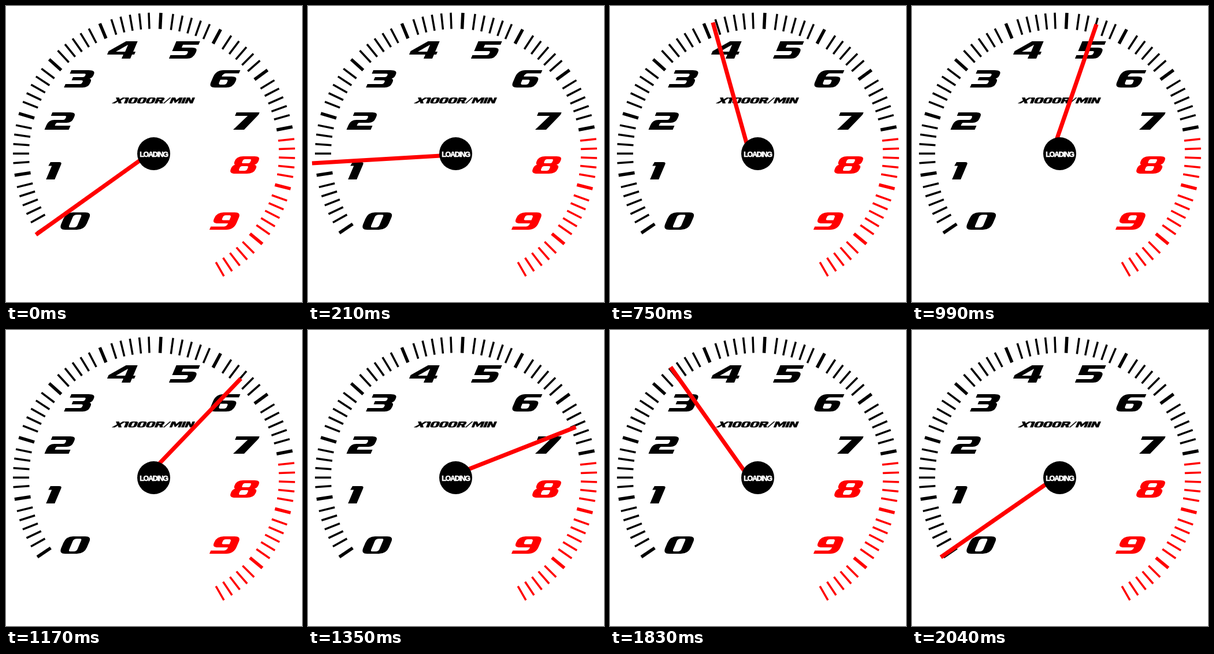
Recreate the animation shown at these times as an HTML page. Size 512 by 512 pixels, loop 2170 ms.

```html
<!DOCTYPE html>
<html lang="en">
<head>
<meta charset="utf-8">
<title>Loading gauge</title>
<style>
  html, body { margin: 0; width: 100%; height: 100%; overflow: hidden; background: #fff; }
  svg { display: block; width: 100vw; height: 100vh; }
  path { fill-rule: evenodd; }
  #unit { stroke: #000; stroke-width: 1.2px; }
  text { font: bold 12.5px "Liberation Sans", Arial, sans-serif; letter-spacing: -1.3px; fill: #fff; stroke: #fff; stroke-width: .7px; }
</style>
</head>
<body>
<svg viewBox="0 0 512 512">
  <g id="ticks"></g>
  <g id="digits"></g>
  <g id="unit" role="img" aria-label="X1000R/MIN"></g>
  <g id="needle"><path fill="#f00" d="M-5.4 -10L-3.6 -237H3.6L1.8 -10Z"/></g>
  <circle cx="255.5" cy="255.5" r="28.5"/>
  <text x="255.5" y="261" text-anchor="middle">LOADING</text>
</svg>
<script>
const RED = '#f00', BLACK = '#000';
const $ = id => document.getElementById(id);

function add(parent, tag, attrs) {
  const el = document.createElementNS('http://www.w3.org/2000/svg', tag);
  for (const k in attrs) el.setAttribute(k, attrs[k]);
  parent.append(el);
}

// Upright glyphs, 30 units tall; the slant is added when they are placed.
const six = 'M13 0H42V5.5H19Q14.5 6 14.5 11H32Q42 11 42 18V20Q42 30 30 30H11Q0 30 0 21V12Q0 0 13 0Z' +
  'M14.5 16.5V22Q15 25 18 25H24Q28 25 28 22V19Q28 16.5 25 16.5Z';
const glyphs = {
  0: 'M12 0H33Q44 0 44 9V19Q44 30 31 30H11Q0 30 0 20V11Q0 0 12 0ZM21 4H26Q29 4 29 7V22Q29 26 24 26H18Q15 26 15 23V8Q15 4 21 4Z',
  1: 'M-5 0H10Q15 0 15 4V30H0V6.5H-6Z',
  2: 'M1 0H32Q42 0 42 7V10Q42 18 33 18H17Q15 18 15 20V23H42V30H0V22Q0 13 10 13H25Q28 13 28 10V8Q28 6 25 6H1Z',
  3: 'M0 0H30Q42 0 42 7V9Q42 13 38 14.5Q42 16 42 20V22Q42 30 32 30H0V24H25Q28 24 28 21V20Q28 17.5 25 17.5H8V12H25Q28 12 28 9V8Q28 6 25 6H0Z',
  4: 'M18 0H38V18H42V23H38V30H23V23H-5V17ZM24 6L8 18H24Z',
  5: 'M0 0H41V6H14V11H32Q42 11 42 18V20Q42 30 31 30H0V24H24Q28 24 28 21V19Q28 17 25 17H0Z',
  6: six,
  7: 'M0 0H40V4L26 30H7L22 6H0Z',
  8: 'M12 0H32Q42 0 42 7V9Q42 13 38 14.5Q43 16 43 20V22Q43 30 31 30H11Q0 30 0 22V20Q0 16 4 14.5Q1 13 1 9V8Q1 0 12 0Z' +
    'M17 5H26Q28.5 5 28.5 7V10Q28.5 12 26 12H17Q14.5 12 14.5 10V7.5Q14.5 5 17 5Z' +
    'M17 17H26Q28.5 17 28.5 19V22Q28.5 25 25 25H17Q14.5 25 14.5 22V19.5Q14.5 17 17 17Z',
  9: six,
  X: 'M0 0H16L24 10L36 0H50L31 15L42 30H26L19 20L6 30H-9L12 15Z',
  R: 'M0 0H33Q43 0 43 7V10Q43 16 37 18L44 30H28L22 19H14V30H0ZM14 6V13H26Q29 13 29 10V8Q29 6 26 6Z',
  '/': 'M22 0H28L6 30H0Z',
  M: 'M0 30V0H18L29 14L40 0H58V30H45V10L31 28H27L13 10V30Z',
  I: 'M0 0H14V30H0Z',
  N: 'M0 30V0H15L29 18V0H42V30H28L13 12V30Z'
};

function glyph(parent, ch, x, y, scale, fill) {
  const flip = ch === 9 ? ' rotate(180 21 15)' : '';
  add(parent, 'path', {
    d: glyphs[ch], fill,
    transform: `translate(${x} ${y}) scale(${scale}) skewX(-23)${flip}`
  });
}

// Scale: 11 long marks, each followed by five thin ones.
function tick(angle, width, fill) {
  add($('ticks'), 'rect', {
    x: -width / 2, y: -244, width, height: 28, fill,
    transform: `translate(256 255.5) rotate(${angle})`
  });
}
for (let i = 0; i <= 10; i++) {
  const angle = -124.2 + 25.4 * i;
  tick(angle, 5.5, i > 8 ? RED : BLACK);
  for (let k = 0; k < 5; k++) tick(angle + 5 + 3.87 * k, 3.5, i > 7 ? RED : BLACK);
}

const places = [[104, 357], [82, 270], [79.3, 184], [113, 111], [189.7, 61],
  [294.6, 61], [363.3, 111], [398.6, 184], [398.2, 260], [364.6, 357]];
places.forEach(([x, y], n) => glyph($('digits'), n, x, y, 1, n > 7 ? RED : BLACK));

const offsets = [0, 56, 76, 124, 172, 221, 268, 302, 365, 384];
[...'X1000R/MIN'].forEach((ch, i) => glyph($('unit'), ch, 190.4 + offsets[i] * .32, 158.6, .32, BLACK));

// Needle: near-linear climb, then an accelerating fall.
const LOOP = 2170, STEP = 30, LAST = 68, PEAK = 47, TOP = 76.4;
const climb = [[0, -126], [7, -93.8], [17, -50.7], [33, 18.6], [45, 68.1], [PEAK, TOP]];

function needleAngle(step) {
  if (step >= PEAK) {
    const n = step - PEAK;
    return TOP - 4.84 * n - .2267 * n * n;
  }
  const i = climb.findIndex(([s]) => s > step);
  const [s0, a0] = climb[i - 1], [s1, a1] = climb[i];
  return a0 + (a1 - a0) * (step - s0) / (s1 - s0);
}

function draw(now) {
  const step = Math.min(Math.floor((now % LOOP) / STEP), LAST);
  $('needle').setAttribute('transform', `translate(243.5 256.3) rotate(${needleAngle(step)})`);
}

const start = performance.now();
function loop() {
  draw(performance.now() - start);
  requestAnimationFrame(loop);
}
loop();
</script>
</body>
</html>
```
